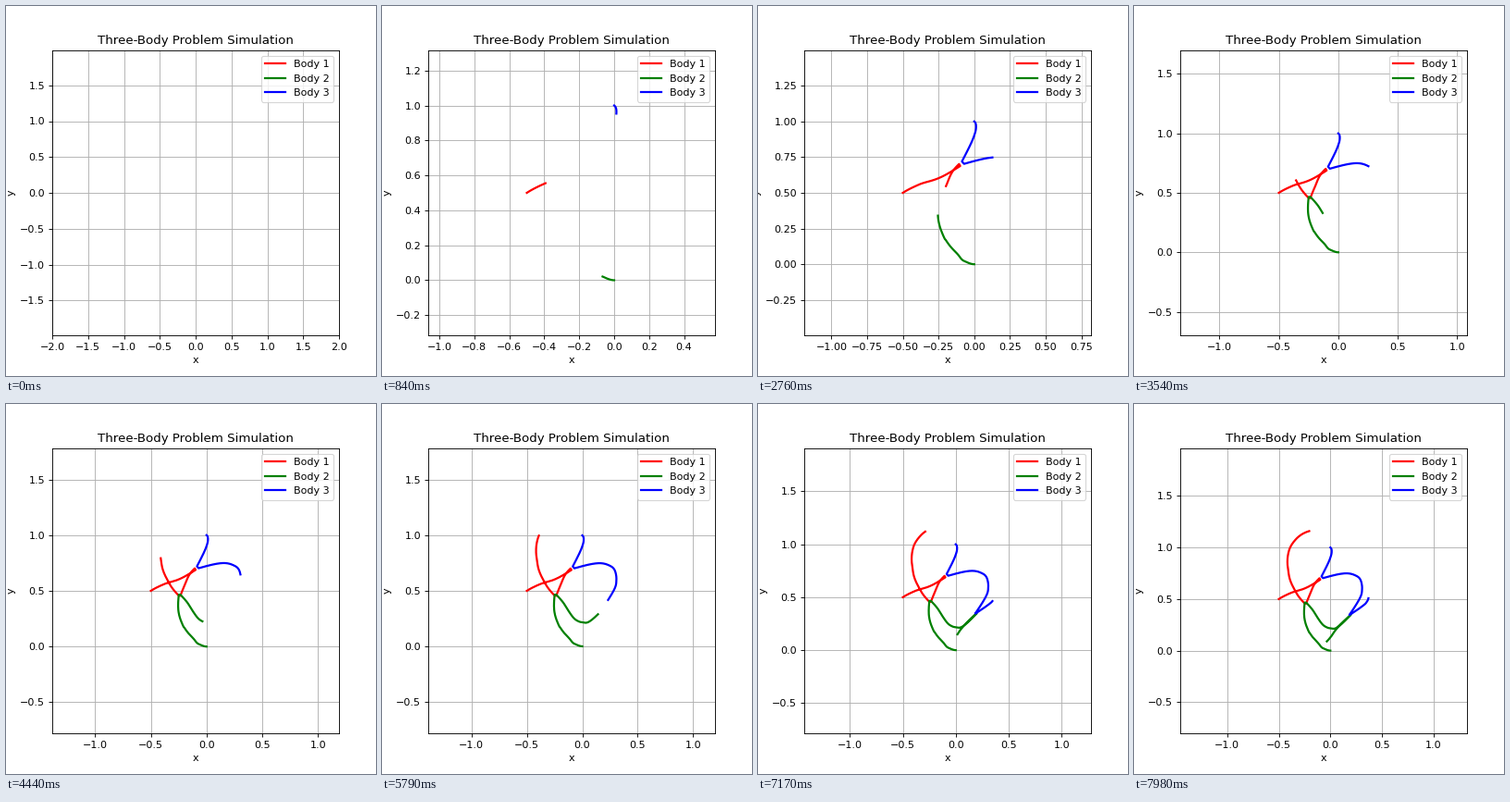
Animation of 400x400 px, one loop 8000 ms. Source, as a matplotlib script:

```python
import numpy as np
import matplotlib.pyplot as plt
from matplotlib.animation import FuncAnimation

FRAMES = 267
STEP_MS = 30
MASSES = 1.1, .907, 1.0
MOMENTUM = np.array([.00249, .00118])

# Key points (frame, x, y) of the smooth arcs between close encounters.
BODY_1 = [
    [(0, -.5, .5), (30, -.383, .5595), (60, -.194, .63), (70, -.098, .688)],
    [(71, -.106, .702), (75, -.133, .674), (92, -.198, .547),
     (102, -.235, .456)],
    [(103, -.249, .457), (110, -.308, .525), (118, -.355, .605),
     (148, -.411, .793), (185, -.402, .968), (219, -.338, 1.076),
     (266, -.205, 1.159)],
]
BODY_3 = [
    [(0, 0, 1), (22, .0128, .967), (40, .005, .917), (60, -.037, .816),
     (70, -.086, .72)],
    [(71, -.071, .703), (75, -.021, .717), (92, .1275, .748),
     (118, .2535, .724), (148, .304, .647), (160, .3075, .6),
     (185, .274, .486), (200, .184, .346)],
    [(201, .19, .348), (209, .263, .397), (219, .3115, .432),
     (242, .35, .468), (266, .369, .508)],
]


def arc(points):
    """Cubic Hermite curve through the key points, sampled at every frame."""
    t, xy = np.split(np.array(points, float), [1], axis=1)
    slope = np.gradient(xy, t[:, 0], axis=0, edge_order=2)
    n = np.arange(t[0, 0], t[-1, 0] + 1)
    i = np.clip(np.searchsorted(t[:, 0], n, side="right") - 1, 0, len(t) - 2)
    h = t[i + 1] - t[i]
    s = (n[:, None] - t[i]) / h
    return ((1 + 2 * s) * (1 - s) ** 2 * xy[i]
            + s * (1 - s) ** 2 * h * slope[i]
            + s ** 2 * (3 - 2 * s) * xy[i + 1]
            + s ** 2 * (s - 1) * h * slope[i + 1])


def path(arcs):
    return np.vstack([arc(a) for a in arcs])


def third_path(p1, p3):
    """Path of body 2, which starts at the origin, from conserved momentum."""
    m1, m2, m3 = MASSES
    total = np.arange(FRAMES)[:, None] * MOMENTUM
    return (total - m1 * (p1 - p1[0]) - m3 * (p3 - p3[0])) / m2


first, last = path(BODY_1), path(BODY_3)
paths = [first, third_path(first, last), last]
low = np.minimum.accumulate(np.min(paths, axis=0))
high = np.maximum.accumulate(np.max(paths, axis=0))

fig, ax = plt.subplots(figsize=(5, 5), dpi=80)
ax.set_title("Three-Body Problem Simulation")
ax.set_xlabel("x")
ax.set_ylabel("y")
ax.grid(True)
lines = [ax.plot([], [], color=c, lw=2, label=f"Body {k}")[0]
         for k, c in enumerate(("red", "green", "blue"), 1)]
ax.legend(loc="upper right")
box = ax.get_position()
ASPECT = box.height / box.width


def draw(n):
    if n == 0:
        cx, cy, half = 0, 0, 2
    else:
        cx, cy = (low[n] + high[n]) / 2
        half = 1.6 * (high[n, 0] - low[n, 0])
    ax.set_xlim(cx - half, cx + half)
    ax.set_ylim(cy - half * ASPECT, cy + half * ASPECT)
    for line, p in zip(lines, paths):
        shown = p[:n + 1] if n else p[:0]
        line.set_data(shown[:, 0], shown[:, 1])
    return lines


anim = FuncAnimation(fig, draw, frames=FRAMES, interval=STEP_MS,
                     init_func=lambda: draw(0), repeat=True, repeat_delay=0)
plt.show()
```
